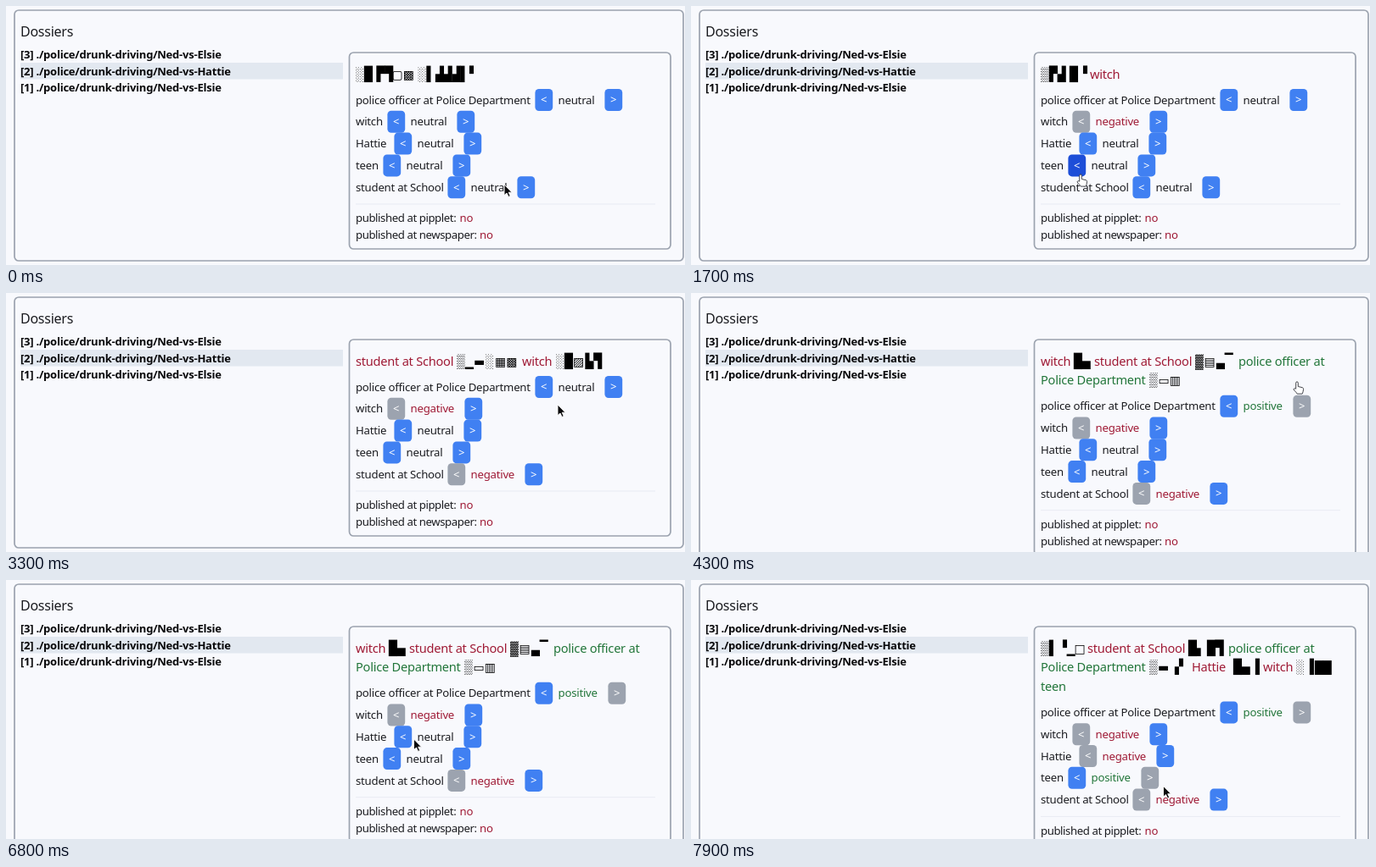
These frames come from a looping animation (800 px wide and 306 px high, 8 s). An HTML page:

```html
<!DOCTYPE html>
<html lang="en">
<head>
<meta charset="utf-8">
<title>Dossiers</title>
<style>
  html, body { margin: 0; width: 100%; height: 100%; overflow: hidden; background: #f8f9fd; }
  svg { display: block; width: 100vw; height: 100vh; }
  text { font: 13.2px "Noto Sans", "Open Sans", sans-serif; letter-spacing: -.24px; fill: #1b1c20; white-space: pre; }
  .title { font-size: 16px; letter-spacing: -.26px; }
  .file { font-size: 13px; font-weight: 700; letter-spacing: -.23px; fill: #08080a; }
  .head { font-size: 14.6px; letter-spacing: -.24px; }
  .block { font: 16.4px "DejaVu Sans Mono", monospace; letter-spacing: 0; fill: #000; }
  .shade { font: 16.4px "Liberation Mono", monospace; letter-spacing: 0; fill: #222; }
  .square { font: 14px "DejaVu Sans", sans-serif; letter-spacing: 0; fill: #000; }
  .note { letter-spacing: -.42px; }
  .sign { font-size: 13px; letter-spacing: 0; text-anchor: middle; fill: #fff; }
  .negative { fill: #9f1a35; }
  .positive { fill: #22763a; }
  .frame { fill: none; stroke: #9ca3af; stroke-width: 1.7; }
</style>
</head>
<body>
<svg id="stage" viewBox="0 0 800 306" preserveAspectRatio="none"></svg>
<script>
const LOOP = 8000, STEP = 100, LINE = 22.7, ROW = 25.8;
const stage = document.getElementById('stage');

const files = ['[3] ./police/drunk-driving/Ned-vs-Elsie',
               '[2] ./police/drunk-driving/Ned-vs-Hattie',
               '[1] ./police/drunk-driving/Ned-vs-Elsie'];

// label and x of its "<" button
const people = [['police officer at Police Department', 623.4], ['witch', 449.4],
                ['Hattie', 457.4], ['teen', 444.4], ['student at School', 520.4]];
const moods = { o: ['neutral', 82], n: ['negative', 91], p: ['positive', 86] };

// Each click sets the moods and a new headline; tokens are [kind, x, text] per line.
const states = [
  { at: 0, mood: 'ooooo', head: [[
    ['d', 412, '░'], ['b', 422, '█'], ['b', 436.5, '▛▜'], ['s', 454.5, '▢▩'], ['d', 485.5, '░'],
    ['b', 495.5, '▌'], ['b', 506, '▟▟▟▌'], ['b', 541, '▝']]] },
  { at: 1200, mood: 'onooo', head: [[
    ['d', 412, '▒'], ['b', 422, '▛▟'], ['b', 446, '█'], ['b', 457, '▝'], ['n', 470, 'witch']]] },
  { at: 2900, mood: 'onoon', head: [[
    ['n', 412, 'student at School'], ['d', 531, '▒'], ['b', 541, '▁'], ['s', 551, '▬'],
    ['d', 565, '░'], ['s', 576, '▦▩'], ['n', 608, 'witch'], ['d', 648, '░'], ['b', 658, '█'],
    ['s', 668, '▨'], ['b', 682.5, '▙▜']]] },
  { at: 4300, mood: 'pnoon', head: [[
    ['n', 412, 'witch'], ['b', 451, '█▄'], ['n', 475, 'student at School'], ['d', 594, '▓'],
    ['s', 604.5, '▤'], ['b', 619, '▃▔'], ['p', 645, 'police officer at']], [
    ['p', 412, 'Police Department'], ['d', 540, '▒'], ['s', 550.5, '▭▥']]] },
  { at: 7100, mood: 'pnnon', head: [[
    ['n', 412, 'Hattie'], ['b', 461, '█▄'], ['n', 485, 'student at School'], ['d', 604, '▓'],
    ['b', 614, '▃'], ['p', 629, 'police officer at'], ['d', 740, '▒']], [
    ['p', 412, 'Police Department'], ['d', 540, '▒'], ['b', 550, '▞'], ['n', 566, 'witch'],
    ['b', 606, '█▙']]] },
  { at: 7500, mood: 'pnnpn', head: [[
    ['d', 412, '▒'], ['b', 422, '▌'], ['b', 433, '▝▁'], ['s', 451.5, '□'],
    ['n', 467, 'student at School'], ['b', 586, '█▖'], ['b', 608, '█▜'],
    ['p', 633, 'police officer at']], [
    ['p', 412, 'Police Department'], ['d', 540, '▒'], ['s', 550, '▬'], ['b', 570, '▞'],
    ['n', 590, 'Hattie'], ['b', 639, '█▄'], ['b', 665, '▌'], ['n', 674, 'witch'], ['d', 713, '░'],
    ['b', 729, '▌'], ['b', 735, '▇▇']], [
    ['p', 412, 'teen']]] }
];
const kinds = { b: 'block', d: 'shade', s: 'square', n: 'head negative', p: 'head positive' };

// pointer path: time, x, y
const path = [[0, 587, 211], [200, 587, 211], [1000, 461, 141], [1300, 461, 141], [1700, 458, 199],
  [2000, 458, 199], [2200, 464, 203], [2500, 464, 203], [2800, 530, 212], [3000, 530, 212],
  [3300, 650, 132], [3400, 658, 112], [3800, 713, 105], [4400, 713, 105], [5100, 462, 190],
  [5300, 462, 190], [5500, 480, 189], [5900, 480, 189], [6300, 541, 203], [6400, 541, 203],
  [6800, 480.5, 188], [7000, 468, 187], [7100, 468, 187], [7400, 537, 209], [7600, 537, 209],
  [7900, 556.5, 243.5], [8000, 556.5, 243.5]];

const text = (x, y, cls, str) =>
  `<text x="${x}" y="${y}" class="${cls}">${str.replace(/</g, '&lt;')}</text>`;
const box = (x, y, w, h, r, attrs) =>
  `<rect x="${x}" y="${y}" width="${w}" height="${h}" rx="${r}" ${attrs}/>`;

function pointerAt(t) {
  const i = path.findIndex(k => k[0] > t);
  const [t0, x0, y0] = path[i - 1], [t1, x1, y1] = path[i];
  const u = (t - t0) / (t1 - t0), e = u * u * (3 - 2 * u);
  return [x0 + (x1 - x0) * e, y0 + (y1 - y0) * e];
}

function drawPointer(x, y, hand) {
  const d = hand
    ? 'M-.3 8V1.2a1.3 1.3 0 0 1 2.6 0V5.5l5 1.2q1.4.4 1.3 2l-.6 3.2q-.3 1.2-.8 2.2H1.2q-1-1.8-3.4-4q-1.4-1.4-.2-2.2q1-.5 2.1.3Z'
    : 'M0 0V12.6L3 10L5 14.4L7.2 13.5L5.2 9.2H9Z';
  const paint = hand ? 'fill="#fff" stroke="#33343a"' : 'fill="#0a0a0c" stroke="#fff"';
  return `<path transform="translate(${x} ${y})" d="${d}" ${paint} stroke-width=".9" stroke-linejoin="round"/>`;
}

function render(t) {
  const state = states.filter(s => s.at <= t).pop();
  const drop = LINE * (state.head.length - 1);
  const [px, py] = pointerAt(t);
  let hand = t >= 4300 && t <= 4400; // pointer is not refreshed until it moves
  let out = box(10, 5, 788, 296 + drop, 5, 'class="frame"')
    + box(404.5, 55, 378.5, 232 + drop, 5, 'class="frame"')
    + box(17, 67, 380, 19.5, 0, 'fill="#e2e8f0"')
    + text(17, 35.5, 'title', 'Dossiers');
  files.forEach((f, i) => out += text(17, 62.2 + 19.5 * i, 'file', f));
  state.head.forEach((line, i) => line.forEach(([kind, x, str]) =>
    out += text(x, 85.6 + LINE * i, kinds[kind], str)));

  const button = (x, y, sign, off) => {
    const over = px >= x && px <= x + 21 && py >= y && py <= y + ROW;
    hand = hand || over;
    const fill = off ? '#9ca3af' : over ? '#1d4ed8' : '#4080f2';
    return box(x, y, 20.8, 26, 4.5, `fill="${fill}"`) + text(x + 10.4, y + 17.4, 'sign', sign);
  };
  people.forEach(([label, x], i) => {
    const m = state.mood[i], [word, gap] = moods[m], y = 98 + drop + ROW * i;
    out += text(412, y + 17.6, '', label) + button(x, y, '<', m === 'n')
      + text(x + 27.2, y + 17.6, word, word) + button(x + gap, y, '>', m === 'p');
  });

  out += box(412, 233.5 + drop, 353, 1, 0, 'fill="#e9ecf3"')
    + text(412, 255.3 + drop, 'note', 'published at pipplet:') + text(534.5, 255.3 + drop, 'negative', 'no')
    + text(412, 275 + drop, 'note', 'published at newspaper:') + text(558, 275 + drop, 'negative', 'no')
    + drawPointer(px, py, hand);
  stage.innerHTML = out;
}

let shown = -1;
function tick() {
  const t = Math.floor(performance.now() % LOOP / STEP) * STEP;
  if (t !== shown) render(shown = t);
  requestAnimationFrame(tick);
}
tick();
</script>
</body>
</html>
```
